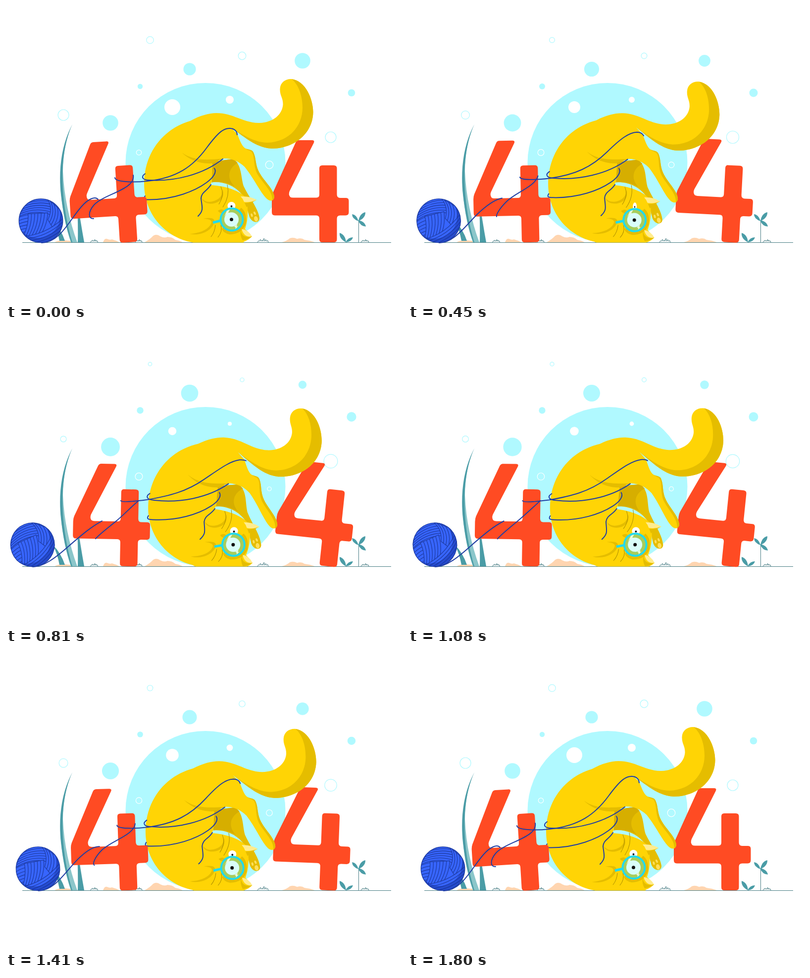
These frames come from a looping animation (800 by 600 pixels, 1.83 s). An HTML page:

```html
<!DOCTYPE html>
<html lang="en">
<head>
<meta charset="utf-8">
<title>404</title>
<style>
html, body { margin: 0; width: 100%; height: 100%; overflow: hidden; background: #fff; }
svg { display: block; width: 800px; height: 600px; }
.y { fill: #ffd405; }
.d { fill: #e5bd00; }
.p { fill: #ffec8e; }
.pad { fill: #ffdf5c; }
.teal { fill: #4a9ca6; }
.pale { fill: #8bc6ca; }
.sand { fill: #ffd5b0; }
.red { fill: #ff4b23; }
.line { fill: none; stroke: #4b7f86; stroke-width: 1; }
.yarn { fill: none; stroke: #1f3da3; stroke-width: 2; stroke-linecap: round; stroke-linejoin: round; }
.wool { fill: #3765ff; stroke: #1f3da3; stroke-width: 1.3; }
.hair { fill: none; stroke: #a98b00; stroke-width: 1; }
</style>
</head>
<body>
<svg viewBox="0 0 800 600">
  <defs>
    <clipPath id="above"><rect width="800" height="479.5"/></clipPath>
    <clipPath id="disc"><circle r="44.5"/></clipPath>
  </defs>

  <circle cx="403" cy="317.5" r="161.5" fill="#b0f9ff"/>
  <g id="bubbles"></g>

  <!-- sea floor -->
  <path class="sand" d="M98 479Q108 474 119 475Q136 476 146 479Z
    M196 479Q199 470 204 472Q210 475 214 473Q222 475 229 479Z
    M280 479Q292 472 297 466Q304 461 312 467Q320 471 326 468Q336 468 342 474Q350 475 357 479Z
    M557 479Q568 476 573 471Q580 468 588 472Q597 469 603 474Q614 475 624 479Z"/>
  <path class="pale" d="M134 240C113 282 107 335 111 378C114 415 121 450 131 479L144 479C128 435 117 385 115 335C115 300 122 265 134 240Z"/>
  <path class="teal" d="M134 240C111 282 106 335 111 382C115 418 122 452 132 479L134 479C123 442 117 405 115 370C112 320 118 275 134 240Z
    M95 436Q104 454 108 476L119 476Q111 452 95 436Z
    M143 385Q146 440 145 479L158 479Q150 435 143 385Z"/>
  <path class="line" d="M33 479.5H778"/>
  <path class="line" id="grass"/>
  <path class="line" d="M712.5 436V479"/>
  <g class="teal" id="leaves"></g>

  <g id="four2"></g>

  <g clip-path="url(#above)"><g id="cat">
    <path class="d" d="M416 316L416 357.5C436 355 460 363 475 380C483 392 487 412 492 428C498 441 513 441 512 429C508 407 492 390 480 365C474 345 477 325 460 310Z"/>
    <path fill="#d6ae00" d="M416 316L416 357.5C430 355 446 357 462 366C444 348 450 328 468 318L458 310Z"/>
    <g class="pad">
      <ellipse cx="505" cy="431.5" rx="3.8" ry="5.5" transform="rotate(-15 505 431.5)"/>
      <ellipse cx="496.5" cy="424" rx="2" ry="3.6" transform="rotate(-15 496.5 424)"/>
      <ellipse cx="502.5" cy="420" rx="2" ry="3.6" transform="rotate(-25 502.5 420)"/>
    </g>
    <path class="y" d="M372 233C392 222 410 217 425 217C460 217 478 237 512 237C540 236 558 220 559.5 200C560 186 553 182 553.5 168
      C554 156 563 148 576 148C606 151 620.5 190 620.5 215C620 260 580 289 537 289C505 288 480 263 453 245L467 259C472 271 476 284 484 289
      C490 292 497 290 500 297C506 310 503 322 512 338C522 356 542 372 542 388C540 397 531 396 525 389C512 375 500 348 482 326
      C470 315 458 309 440 309L417 317L416 356L413 363C436 364 468 371 484 388C490 405 490 432 483 452L497 467Q491 474 480 478
      L480 494L410 494L376 479C325 470 279 425 279 360C279 300 315 250 372 233Z"/>
    <path class="d" d="M577 148C606 152 620.5 190 620.5 215C620 260 580 289 537 289C505 288 480 264 453 245
      C480 262 500 276 528 277C570 276 599 245 599 206C599 184 592 160 577 148Z"/>
    <path class="d" d="M482 288C490 292 497 290 500 297C506 310 503 322 512 338C522 356 542 372 542 388Q541 392 538 394
      C539 376 521 362 508 341C498 322 504 300 494 294Q488 292 482 288Z"/>
    <path class="d" d="M355 297C375 311 395 314 440 309L417 319C390 321 370 311 355 297Z"/>
    <!-- front paw and cheeks -->
    <path class="d" d="M395 388C397 402 418 404 430 396C440 390 440 380 438 372C437 384 432 391 421 395C410 399 400 397 395 388Z"/>
    <path class="d" d="M371 462C388 461 405 455 412 445C417 437 417 432 398 431C415 428 422 430 421 438C417 454 395 467 371 462Z"/>
    <path class="d" d="M428 415Q435 410 440 414L437 420Q431 420 428 415Z"/>
    <path class="d" d="M475 409Q487 418 485 440Q478 462 452 463Q440 461 436 452Z"/>
    <!-- ears -->
    <path class="y" d="M474 386Q492 387 506 393Q493 399 486 407Z"/>
    <path class="d" d="M482 399Q494 399 506 393Q493 400 486 408Z"/>
    <path class="p" d="M474 386Q494 385 506 393Q492 399 481 397Q479 391 474 386Z"/>
    <path class="d" d="M474 453Q476 472 497 467Q488 474 478 475Q472 465 474 453Z"/>
    <path class="p" d="M476 452Q490 454 497 467Q481 470 476 452Z"/>
    <path class="hair" d="M447 362Q453 385 438 408M434 366Q442 383 430 402M434 444Q438 457 428 469M423 444Q422 458 414 468"/>
    <!-- eyes and glasses -->
    <g id="eyeB"><circle r="8" fill="#fff"/><circle cy="1" r="2" fill="#111"/></g>
    <path d="M418 439L434 435" stroke="#22daee" stroke-width="5"/>
    <circle cx="456" cy="432.7" r="22.5" fill="#a8cd5b"/>
    <path fill="#e9fbdc" d="M441 427L446 415L453 411L449 419L452 419L444 428L445 422Z M461 447L467 442L466 447L469 446L463 453L464 449Z"/>
    <g id="eyeA"><circle r="14.5" fill="#d9fdf9"/><circle r="3.5" fill="#111"/></g>
    <circle cx="456" cy="432.7" r="22.5" fill="none" stroke="#22daee" stroke-width="4"/>
    <path class="yarn" d="M281 340C272 346 275 353 290 353C340 356 398 342 438 310
      M281 385C277 391 280 393 290 392.5C340 392 382 375 405 358C420 347 426 336 421 329
      M414 362C407 375 395 376 394 390C396 408 400 414 388 426"/>
  </g></g>

  <g id="four1"></g>

  <g id="ball">
    <g clip-path="url(#disc)">
      <circle r="45" fill="#3765ff"/>
      <g id="wool" class="wool"></g>
      <path fill="#1533a0" fill-opacity=".5" fill-rule="evenodd"
        d="M-46 -46H46V46H-46ZM-51 -10A45 45 0 0 0 39 -10A45 45 0 0 0 -51 -10Z"/>
    </g>
    <circle class="yarn" r="44.3" style="stroke-width:1.3"/>
  </g>
  <g id="strings"></g>
</svg>

<script>
const LOOP = 1830, STEP = 30, HALF = 900;
const $ = id => document.getElementById(id);
const lerp = (a, b, p) => a + (b - a) * p;
const clamp = x => Math.max(0, Math.min(1, x));
const ramp = (t, a, b) => clamp((t - a) / (b - a));
const set = (el, attrs) => {
  for (const k in attrs) el.setAttribute(k, attrs[k]);
  return el;
};
const add = (parent, tag, attrs) =>
  set(parent.appendChild(document.createElementNS('http://www.w3.org/2000/svg', tag)), attrs);

const FOUR = `M592 272H618Q624 272 622 277L573 375Q570 382 574 387Q576 388.5 580 388.5H627Q633 388.5 633 382V329
  Q633 323 639 323H662Q668.5 323 668.5 329V382Q668.5 389 675 389H687Q692.5 389 692.5 395V418Q692.5 424.5 686 424.5H675
  Q668.5 424.5 668.5 431V473Q668.5 479 662 479H639Q633 479 633 473V431Q633 424.5 627 424.5H543Q537 424.5 537 418V390
  Q537 384 539 379L585 277Q587 272 592 272Z`;
add($('four1'), 'path', { d: FOUR, class: 'red', transform: 'translate(-403 0)' });
add($('four2'), 'path', { d: FOUR, class: 'red' });

// x, y, radius at rest, radius at full swing, style
const CYAN = '#b0f9ff';
const bubbles = [
  [371, 128, 12.6, 17.5, 'fill'], [211, 237, 15.8, 19, 'fill'],
  [599, 111, 15.8, 8, 'fill'], [698, 176, 7.3, 9.7, 'fill'], [271, 163, 5.2, 6.8, 'fill'],
  [291, 69, 7.2, 3.6, 'ring'], [477, 101, 7.8, 3.9, 'ring'],
  [116, 221, 11, 5.8, 'ring'], [656, 266, 11, 14, 'ring'],
  [336, 205, 16, 8, 'white'], [452, 190, 8, 4, 'white'],
  [268.5, 297, 5.2, 7.5, 'whiteRing'], [532, 322, 7.8, 3.9, 'whiteRing']
].map(([cx, cy, a, b, kind]) => {
  const color = kind.startsWith('white') ? '#fff' : CYAN;
  const look = /ring/i.test(kind)
    ? { fill: 'none', stroke: color, 'stroke-width': 1.2 } : { fill: color };
  return { a, b, el: add($('bubbles'), 'circle', { cx, cy, ...look }) };
});

// a row of blades: x centre, width, height
const tuft = (x, w, h) => {
  const blades = [.4, .75, .6, 1, .7, .5], gap = w / blades.length;
  return `M${x - w / 2} 479` + blades.map((k, i) =>
    `L${x - w / 2 + gap * (i + .6)} ${479 - h * k}L${x - w / 2 + gap * (i + 1)} ${i < 5 ? 477 : 479}`).join('');
};
set($('grass'), { d: [[178, 15, 6], [268, 14, 6], [519, 22, 8], [725, 16, 6]].map(g => tuft(...g)).join('') });

// leaf from base to tip with a bulge on both sides
for (const [x, y, u, v] of [[712, 436, 699, 422], [712, 436, 726, 418], [711, 434, 727, 447],
                            [687, 479, 674, 460], [686, 479, 701, 469]]) {
  const nx = (v - y) * .33, ny = (x - u) * .33, mx = lerp(x, u, .6), my = lerp(y, v, .6);
  add($('leaves'), 'path', {
    d: `M${x} ${y}Q${mx + nx} ${my + ny} ${u} ${v}Q${mx - nx} ${my - ny} ${x} ${y}Z`
  });
}

// a bundle of strands between two quadratic curves, hiding what lies below
const bundle = (a, b, n) => {
  let d = `M${a[0]} ${a[1]}Q${a[2]} ${a[3]} ${a[4]} ${a[5]}L${b[4]} ${b[5]}Q${b[2]} ${b[3]} ${b[0]} ${b[1]}Z`;
  add($('wool'), 'path', { d });
  for (let i = 1; i < n; i++) {
    const q = a.map((v, k) => lerp(v, b[k], i / n));
    add($('wool'), 'path', { d: `M${q[0]} ${q[1]}Q${q[2]} ${q[3]} ${q[4]} ${q[5]}`, fill: 'none' });
  }
};
bundle([-30, -35, 0, -46, 30, -36], [-46, -8, -14, -24, 20, -12], 5);
bundle([-46, -6, -34, -12, -16, -14], [-44, 26, -30, 20, -20, 24], 5);
bundle([-26, -14, -24, 10, -38, 36], [14, -16, 12, 14, -6, 36], 6);
bundle([12, -46, 26, -26, 14, -2], [48, -14, 46, 8, 30, 24], 5);
bundle([-40, 32, 10, 30, 48, -8], [-16, 50, 26, 44, 48, 18], 4);

// loose strings: slack and taut versions of the same curve
const strings = [
  ['M72 480C110 479 127 435 153 406C166 391 180 385 186 392',
   'M54 480C76 480 100 462 128 437C156 413 172 399 194 387'],
  ['M177 431C166 432 165 418 178 403C198 381 262 372 257 343',
   'M181 423C190 413 205 402 222 388C238 375 252 359 268 346'],
  ['M220 348C220 357 258 358 285 355C345 349 378 325 405 288C430 254 441 247 453 248C463 249 467 255 467 261',
   'M232 346C234 350 262 347 285 344C330 336 364 328 400 303C430 283 452 266 472 263.5C478 263 481 263 485 265']
].map(([slack, taut]) => ({
  slack, taut: taut.match(/[\d.]+/g), el: add($('strings'), 'path', { class: 'yarn' })
}));
const mix = (a, b, p) => {
  let i = 0;
  return a.replace(/[\d.]+/g, n => lerp(+n, +b[i++], p).toFixed(2) + ' ');
};

const swing = u => u < .5 ? Math.pow(2 * u, 2.5) / 2 : 1 - Math.pow(2 - 2 * u, 2.5) / 2;
const eye = (el, x, y, open) =>
  set(el, { transform: `translate(${x} ${y}) scale(${Math.max(open, .03)} 1)`, opacity: open > 0 ? 1 : .25 });

function draw(now) {
  const t = Math.floor((now % LOOP) / STEP) * STEP;
  const u = clamp(1 - Math.abs(t - HALF) / HALF);
  const p = swing(u), soft = u * u * (3 - 2 * u);

  for (const b of bubbles) b.el.setAttribute('r', lerp(b.a, b.b, soft));
  set($('cat'), { transform: `rotate(${3.75 * p} 418 486)` });
  set($('four1'), { transform: `rotate(${lerp(-3.55, 1.1, p)} 247 479)` });
  set($('four2'), { transform: `rotate(${6.1 * p} 650 479)` });
  set($('ball'), { transform: `translate(${70.5 - 17 * p} 435.3) rotate(${-22 * p})` });
  for (const s of strings) s.el.setAttribute('d', mix(s.slack, s.taut, p));

  const shut = 1 - ramp(t, 150, 240);
  eye($('eyeA'), 455.5, 432.7, shut + ramp(t, 300, 420));
  eye($('eyeB'), 455.5, 405, shut + ramp(t, 390, 510));
}

const start = performance.now();
function tick() {
  draw(performance.now() - start);
  requestAnimationFrame(tick);
}
tick();
</script>
</body>
</html>
```
